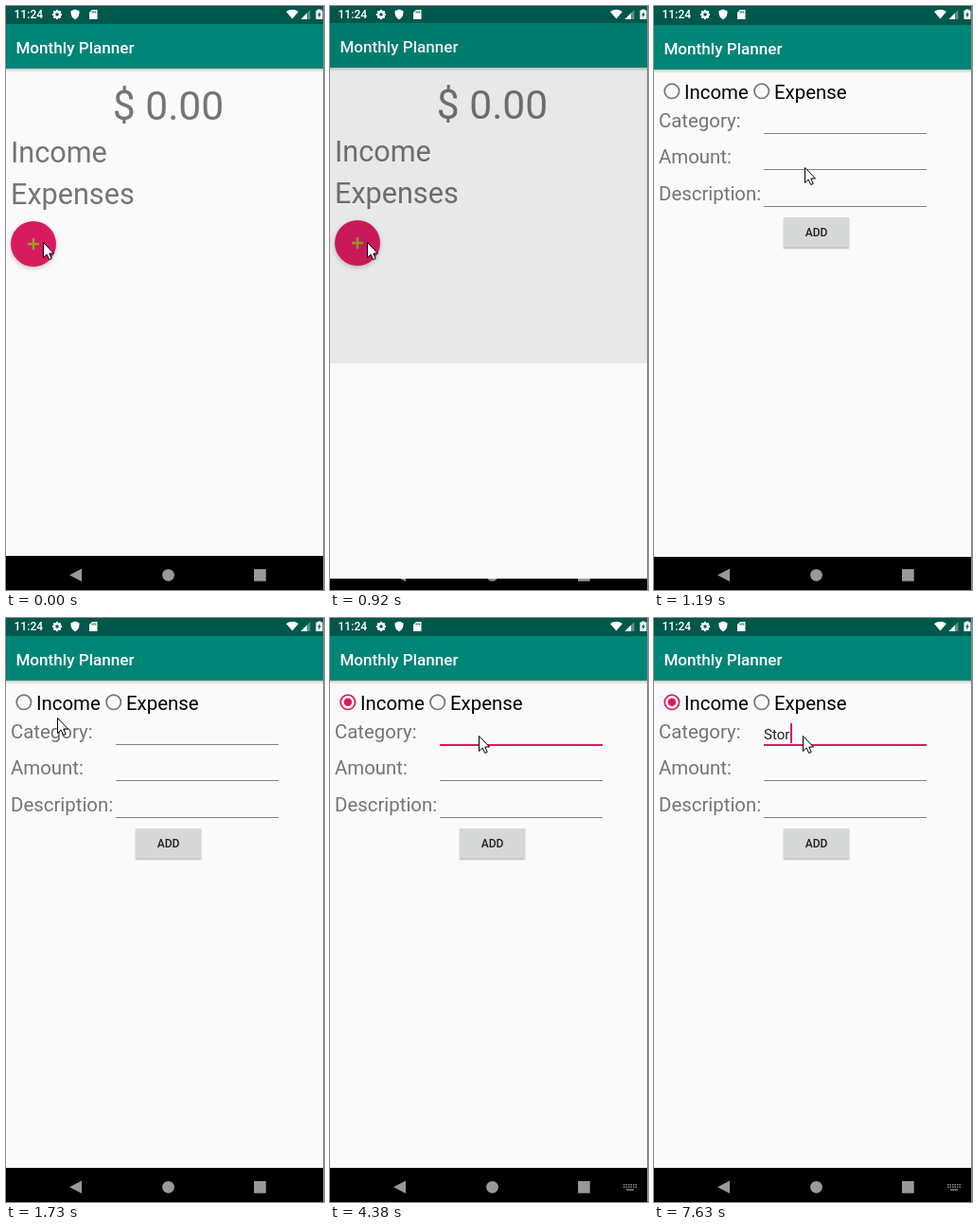
These frames come from a looping animation (336 by 616 pixels, 8 s). An HTML page with a canvas:

```html
<!DOCTYPE html>
<html lang="en">
<head>
<meta charset="utf-8">
<title>Monthly Planner</title>
<style>
  html, body { margin: 0; width: 100%; height: 100%; overflow: hidden; background: #000; }
  canvas { display: block; }
</style>
</head>
<body>
<canvas id="stage" width="336" height="616"></canvas>
<script>
const c = document.getElementById('stage').getContext('2d');
const LOOP = 8000, W = 336, H = 616, BAR_TOP = 19, NAV_TOP = 580;
const PRESS = 650, OPEN = 920, SELECT = 2120, FOCUS = 3300, CARET = 3450, BLINK = 490;
const PINK = '#d81b60', GREY = '#757575', PAPER = '#fafafa', STATUS = '#00574b', INK = '#212121';

const WORD = 'Stor', KEY_TIMES = [5800, 6390, 7350, 7630];
const POINTER = [
  { t: OPEN, x: 39, y: 249 },
  { t: 1040, x: 98, y: 222 },
  { t: 1310, x: 203, y: 132 },
  { t: 1865, x: 28, y: 100 },
  { t: 2000, x: 25, y: 96 },
  { t: 2510, x: 25, y: 96 },
  { t: 2810, x: 157, y: 124 },
];

const progress = (t, from, to) => Math.min(1, Math.max(0, (t - from) / (to - from)));
const smooth = p => p * p * (3 - 2 * p);

// Motion is shown at uneven steps of 120 and 150 ms.
function stepped(t) {
  const beat = OPEN + 270 * Math.floor((t - OPEN) / 270);
  return t - beat < 120 ? beat : beat + 120;
}

function pointerAt(t) {
  const at = { ...POINTER[0] };
  POINTER.slice(1).forEach((next, i) => {
    const from = POINTER[i], p = smooth(progress(t, from.t, next.t));
    at.x += (next.x - from.x) * p;
    at.y += (next.y - from.y) * p;
  });
  return at;
}

function rect(x, y, w, h, color) {
  c.fillStyle = color;
  c.fillRect(x, y, w, h);
}
function circle(x, y, r, color) {
  c.fillStyle = color;
  c.beginPath();
  c.arc(x, y, r, 0, 7);
  c.fill();
}
function ring(x, y, r, width, color) {
  c.strokeStyle = color;
  c.lineWidth = width;
  c.beginPath();
  c.arc(x, y, r, 0, 7);
  c.stroke();
}
function shape(path, color) {
  c.fillStyle = color;
  c.fill(new Path2D(path));
}
function text(str, x, y, size, color, weight = 400, align = 'left') {
  c.font = `${weight} ${size}px Roboto, sans-serif`;
  c.textAlign = align;
  c.fillStyle = color;
  c.fillText(str, x, y);
}
function isolated(draw) {
  c.save();
  draw();
  c.restore();
}
function shadow(blur, dy, alpha) {
  c.shadowColor = `rgba(0,0,0,${alpha})`;
  c.shadowBlur = blur;
  c.shadowOffsetY = dy;
}

function appBar() {
  rect(0, BAR_TOP, W, NAV_TOP - BAR_TOP, PAPER);
  const fade = c.createLinearGradient(0, 66, 0, 70);
  fade.addColorStop(0, 'rgba(0,0,0,.2)');
  fade.addColorStop(1, 'rgba(0,0,0,0)');
  rect(0, 66, W, 4, fade);
  rect(0, BAR_TOP, W, 47, '#008577');
  text('Monthly Planner', 10.4, 49.5, 17.1, '#fff', 500);
}

function overview(t) {
  const plus = '#8fa81c';
  appBar();
  text('$ 0.00', 171.5, 120, 42.5, GREY, 400, 'center');
  text('Income', 5, 165, 30.6, GREY);
  text('Expenses', 5, 208.5, 30.6, GREY);
  isolated(() => {
    shadow(5, 2, .2);
    circle(29, 251, 24, PINK);
  });
  if (t >= PRESS && t < OPEN) circle(29, 251, 24, 'rgba(255,255,255,.1)');
  rect(23, 249.8, 12, 2.4, plus);
  rect(27.8, 245, 2.4, 12, plus);
}

function categoryInput(t) {
  const presses = KEY_TIMES.filter(k => k <= t);
  const value = WORD.slice(0, presses.length);
  text(value, 116, 127.5, 15, INK);
  const sinceReset = t - (presses.pop() ?? CARET);
  const lit = Math.floor(sinceReset / BLINK) % 2 === 0;
  if (t >= CARET && lit) rect(116 + Math.ceil(c.measureText(value).width), 111, 2, 21, PINK);
}

function form(t) {
  appBar();
  const press = progress(stepped(t), SELECT - 120, SELECT + 240);
  const dot = 4.3 * progress(stepped(t), SELECT, SELECT + 400);
  circle(19, 89, 17, `rgba(0,0,0,${.1 * Math.sin(press * Math.PI)})`);
  ring(18.9, 88.8, 7.7, 1.7, dot ? PINK : GREY);
  circle(18.9, 88.8, dot, PINK);
  ring(113.7, 88.8, 7.7, 1.7, GREY);
  text('Income', 32, 96.7, 20.4, '#000');
  text('Expense', 127, 96.7, 20.4, '#000');

  ['Category:', 'Amount:', 'Description:'].forEach((label, i) => {
    const focused = i === 0 && t >= FOCUS, drop = i * 38.4;
    text(label, 5, 127 + drop, 20.4, GREY);
    rect(116, Math.round(133 + drop), 172, focused ? 2 : 1, focused ? PINK : '#828282');
  });
  categoryInput(t);

  isolated(() => {
    shadow(1.5, 1, .25);
    rect(137, 222, 69, 31.5, '#d6d7d7');
  });
  text('ADD', 171.5, 242.3, 12, INK, 500, 'center');
}

function navBar(t) {
  const grey = '#999';
  rect(0, NAV_TOP, W, H - NAV_TOP, '#000');
  shape('M67 600.3 l13 -6.7 v13.4z', grey);
  circle(171.5, 600.3, 6.4, grey);
  rect(262, 594, 12.7, 12.7, grey);
  if (t < CARET) return;
  for (let x = 310; x < 324; x += 2.5) {
    rect(x, 597, 1.5, 1.5, '#888');
    rect(x, 599.5, 1.5, 1.5, '#888');
  }
  rect(313, 602.3, 8, 1.5, '#888');
}

function statusIcons() {
  const white = '#fff';
  text('11:24', 8.5, 13.4, 12.1, white, 500);

  for (let a = 0; a < 6; a += Math.PI / 4) circle(54 + 4 * Math.cos(a), 9 + 4 * Math.sin(a), 1.2, white);
  ring(54, 9, 2.9, 2.2, white);
  shape('M73 3.5 l4.5 1.8 q.5 6.7 -4.5 9 q-5 -2.3 -4.5 -9z', white);
  shape('M91 4 h5.5 v10 h-8.5 v-7z', white);
  for (let x = 90.6; x < 95; x += 1.8) rect(x, 5.5, 1, 2, STATUS);

  shape('M302.5 13.5 l-6.5 -7.5 q6.5 -4.5 13 0z', white);
  shape('M321.5 4 v10 h-10z', 'rgba(255,255,255,.35)');
  shape('M318 7.5 v6.5 h-6.5z', white);
  rect(329.5, 3.5, 3, 1.5, white);
  rect(327.5, 4.5, 7, 9.5, white);
  shape('M331.8 5.8 l-2.8 4 h1.7 l-.5 3 l2.8 -4.2 h-1.6z', STATUS);
}

function arrow({ x, y }) {
  const outline = new Path2D('M0 0 v16 l3.7 -3.4 l2.5 5.4 l2.5 -1 l-2.4 -5.5 h4.7z');
  isolated(() => {
    c.translate(Math.round(x) + .5, Math.round(y) + .5);
    c.fillStyle = '#fff';
    c.fill(outline);
    c.strokeStyle = '#000';
    c.lineWidth = 1;
    c.stroke(outline);
  });
}

// The form rises and is revealed upwards while the overview dims and drifts away.
function openForm(t) {
  const age = stepped(t) - OPEN;
  const rest = Math.exp(-age / 97);
  const offset = Math.round(24 * rest);
  const revealTop = Math.round(377 * Math.exp(-age / 53.5));
  if (revealTop > BAR_TOP) isolated(() => {
    c.translate(0, Math.round(-12 * (1 - .92 * rest)));
    overview(t);
    rect(0, BAR_TOP, W, NAV_TOP - BAR_TOP, `rgba(0,0,0,${.1 - .028 * rest})`);
  });
  isolated(() => {
    c.beginPath();
    c.rect(0, revealTop, W, NAV_TOP + offset - revealTop);
    c.clip();
    c.translate(0, offset);
    form(t);
  });
}

function draw(t) {
  rect(0, 0, W, H, STATUS);
  navBar(t);
  (t < OPEN ? overview : openForm)(t);
  statusIcons();
  rect(W - 1, 0, 1, H, '#7f8a8c');
  arrow(pointerAt(stepped(t)));
}

const start = performance.now();
function tick() {
  draw((performance.now() - start) % LOOP);
  requestAnimationFrame(tick);
}
tick();
</script>
</body>
</html>
```
